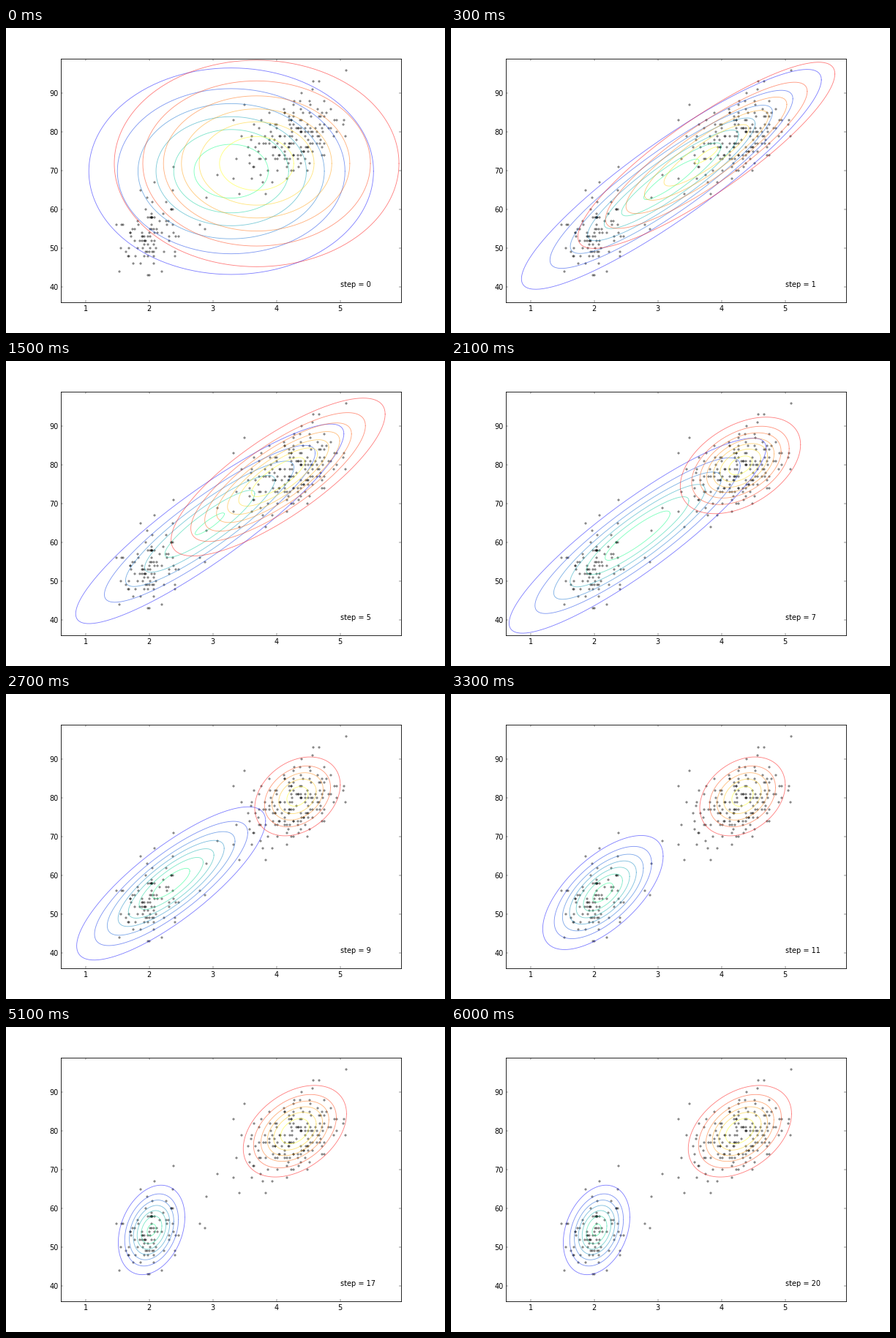
Write a matplotlib script that moves like this. It is 600 by 417 pixels and loops after 6.3 s.

```python
import numpy as np
import matplotlib.pyplot as plt
from matplotlib.animation import FuncAnimation

STEPS, INTERVAL, MAX_RINGS = 21, 300, 9
MEAN, STD = np.array([3.488, 70.9]), np.array([1.1414, 13.595])
OFFSET = np.array([.2, 1])

plt.rcParams.update({"font.family": "DejaVu Sans", "font.size": 11.7,
                     "axes.linewidth": 1.0})


def rush(power):
    return lambda u: u**power


def settle(power):
    return lambda u: 1 - (1 - u)**power


def start(sign):
    return [*(MEAN + sign * OFFSET), *STD**2, 0]


# Poses: step, easing towards it, (mean x, mean y, var x, var y, covariance)
LOW = [
    (0, None, start(-1)),
    (1, rush(1), (3.213, 67.8, 1.38, 200, 15.03)),
    (7, rush(1.75), (2.681, 61.78, 1.066, 165.6, 11.92)),
    (14, settle(2.2), (2.036, 54.48, .0692, 33.7, .435)),
]
HIGH = [
    (0, None, start(1)),
    (1, rush(1), (3.763, 74.0, 1.13, 160, 11.75)),
    (7, rush(1.75), (4.298, 79.92, .2209, 38.4, 1.25)),
    (11, settle(9), (4.331, 80.44, .1315, 30.2, .58)),
    (14, rush(1), (4.29, 79.97, .17, 36.05, .941)),
]


def pose(path, step):
    for (t0, _, a), (t1, ease, b) in zip(path, path[1:]):
        if step <= t1:
            f = ease((step - t0) / (t1 - t0))
            return (1 - f) * np.array(a) + f * np.array(b)
    return np.array(path[-1][2])


def mean_and_root(params):
    mx, my, vx, vy, cov = params
    return np.array([mx, my]), np.linalg.cholesky([[vx, cov], [cov, vy]])


def sample(rng, path, n, reach=2.3):
    """Observations around the final cluster, on the measuring grid."""
    mean, root = mean_and_root(path[-1][2])
    z = rng.normal(size=(2 * n, 2))
    z = z[np.hypot(*z.T) < reach][:n]
    x, y = (mean + z @ root.T).T
    return np.column_stack([np.round(x * 60) / 60, np.round(y)])


def level_step(peak, bins=8):
    """Smallest round step that covers the peak in the given bins."""
    raw = peak / bins
    scale = 10 ** np.floor(np.log10(raw))
    return scale * next(s for s in (1, 1.5, 2, 2.5, 3, 4, 5, 6, 8, 10)
                        if s >= raw / scale)


ANGLE = np.linspace(0, 2 * np.pi, 241)
CIRCLE = np.array([np.cos(ANGLE), np.sin(ANGLE)])


def draw_rings(lines, cmap, params):
    mean, root = mean_and_root(params)
    peak = 1 / (2 * np.pi * np.linalg.det(root))
    ratio = peak / level_step(peak)
    count = int(ratio)
    for k, line in enumerate(lines, 1):
        line.set_visible(k <= count)
        if k <= count:
            r = np.sqrt(2 * np.log(ratio / k))
            line.set_data(*(mean[:, None] + r * root @ CIRCLE))
            line.set_color(cmap((k - 1) / max(count - 1, 1)))


fig = plt.figure(figsize=(10, 6.95), dpi=60, facecolor="white")
ax = fig.add_axes([.125, .1, .775, .8])
ax.set(xlim=(.61, 5.96), ylim=(36, 99),
       xticks=range(1, 6), yticks=range(40, 100, 10))
ax.tick_params(direction="in", length=4, width=.5, pad=4, top=True, right=True)

rng = np.random.default_rng(7)
STRAYS = [(5.1, 96), (3.5, 87), (3.32, 83), (2.38, 71), (3.07, 69), (3.33, 68),
          (3.42, 64), (3.83, 64), (2.9, 63), (2.8, 56), (2.88, 55), (1.98, 43)]
points = np.vstack([STRAYS, sample(rng, LOW, 92), sample(rng, HIGH, 168)])
ax.plot(*points.T, "k+", ms=4.8, mew=.55)

groups = [(path, plt.get_cmap(name),
           [ax.plot([], [], lw=1.05, alpha=.5, zorder=3)[0]
            for _ in range(MAX_RINGS)])
          for path, name in ((LOW, "winter"), (HIGH, "autumn"))]
label = ax.text(5, 40, "")


def update(step):
    for path, cmap, lines in groups:
        draw_rings(lines, cmap, pose(path, step))
    label.set_text(f"step = {step}")
    return [label]


anim = FuncAnimation(fig, update, frames=STEPS, interval=INTERVAL,
                     repeat=True, repeat_delay=0, blit=False)
plt.show()
```
